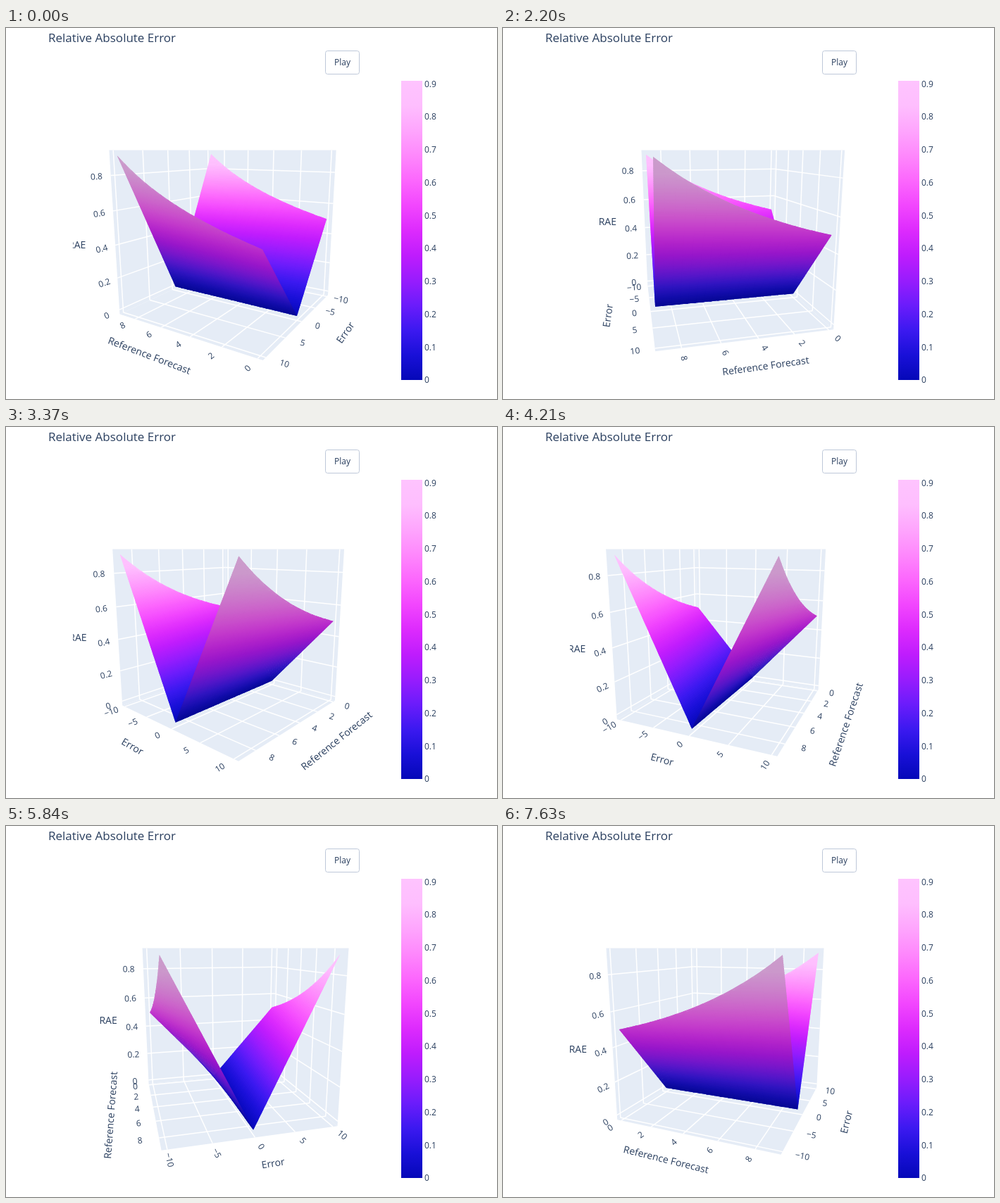
An HTML page with a canvas for the animation above (8 s loop, 697 by 527 pixels).

```html
<!DOCTYPE html>
<html>
<head>
<meta charset="utf-8">
<title>Relative Absolute Error</title>
<style>
html, body { margin: 0; width: 100%; height: 100%; overflow: hidden; background: #fff; }
canvas { display: block; }
</style>
</head>
<body>
<canvas id="stage" width="697" height="527"></canvas>
<script>
const ctx = document.getElementById('stage').getContext('2d');
const INK = '#2a3f5f', FONT = 'px "Open Sans", sans-serif';
const LOOP = 8000;

// camera: starts at (-1.25, 2, 0.5) and circles in steps of 0.1 rad
const EYE_Z = 0.5, RADIUS = Math.hypot(1.25, 2), START = Math.atan2(2, -1.25);
const DIST = Math.hypot(RADIUS, EYE_Z), SIN = EYE_Z / DIST, COS = RADIUS / DIST;
const SCENE = { x: 95, y: 65, w: 446.8, h: 445 };
const CX = SCENE.x + SCENE.w / 2, CY = SCENE.y + SCENE.h / 2;
const FOCAL = SCENE.h / 2 / Math.tan(Math.PI / 8);

// [time, step] at the uneven moments; between them one step per entry, evenly spaced
const KEYS = [[0, 0], [230, 1], [730, 2], [1110, 4], [1590, 5], [1780, 6], [2200, 8],
  [2660, 10], [2895, 12], [3370, 14], [3830, 16], [4210, 17], [5160, 21], [5370, 22],
  [5840, 24], [6000, 25], [6460, 27], [6695, 29], [7630, 33]];

function stepAt(t) {
  let i = KEYS.length - 1;
  while (KEYS[i][0] > t) i--;
  const [t0, n0] = KEYS[i];
  if (i === KEYS.length - 1) return n0;
  const [t1, n1] = KEYS[i + 1];
  const gap = n1 - n0;
  // a double step within one short interval is a single jump
  if (t1 - t0 < 300) return n0;
  return n0 + Math.floor((t - t0) / (t1 - t0) * gap + 1e-6);
}

// data: z = |error| / (20 - reference)
const Z_MAX = 10 / 11;
const toX = r => (r - 4.5) / 9 * 16 / 17;
const toY = e => e / 20 * 16 / 17;
const toZ = z => (z / Z_MAX - 0.5) * 16 / 17;
const X_TICKS = [0, 2, 4, 6, 8], Y_TICKS = [-10, -5, 0, 5, 10], Z_TICKS = [0, 0.2, 0.4, 0.6, 0.8];

const COLORS = ['0508b8', '1910d8', '3c19f0', '6b1cfb', '981cfd', 'bf1cfd', 'dd2bfd',
  'f246fe', 'fc67fd', 'fe88fc', 'fea5fd', 'febefe', 'fec3fe']
  .map(c => [0, 2, 4].map(i => parseInt(c.substr(i, 2), 16)));

function shade(v, light) {
  const p = Math.min(v, 0.9999) * 12, i = Math.floor(p), f = p - i;
  const mix = COLORS[i].map((c, k) => Math.round((c + (COLORS[i + 1][k] - c) * f) * light));
  return `rgb(${mix})`;
}

let ca, sa;
function project([x, y, z]) {
  const side = y * ca - x * sa, near = x * ca + y * sa;
  const depth = DIST - near * COS - z * SIN;
  return [CX + FOCAL * side / depth, CY - FOCAL * (z * COS - near * SIN) / depth];
}

function fill(points, color) {
  ctx.fillStyle = color;
  ctx.beginPath();
  points.forEach(p => ctx.lineTo(p[0], p[1]));
  ctx.fill();
}

function line(a, b) {
  ctx.beginPath();
  ctx.moveTo(...project(a));
  ctx.lineTo(...project(b));
  ctx.stroke();
}

function text(str, x, y, size, align = 'left', angle = 0) {
  ctx.save();
  ctx.translate(x, y);
  ctx.rotate(angle);
  ctx.font = size + FONT;
  ctx.textAlign = align;
  ctx.fillStyle = INK;
  ctx.fillText(str, 0, size * 0.36);
  ctx.restore();
}

// text at a point in space, turned along dir but kept upright
function label(str, pos, size, dir) {
  const [x, y] = project(pos);
  let angle = 0;
  if (dir) {
    const [u, v] = project(pos.map((p, i) => p + dir[i] * 0.01));
    angle = Math.atan2(v - y, u - x);
    if (angle > Math.PI / 2) angle -= Math.PI;
    if (angle <= -Math.PI / 2) angle += Math.PI;
  }
  text(String(str).replace('-', '\u2212'), x, y, size, 'center', angle);
}

function drawBox(bx, by) {
  const h = 0.5, wall = '#e5ecf6';
  fill([[-h, -h, -h], [h, -h, -h], [h, h, -h], [-h, h, -h]].map(project), wall);
  fill([[bx, -h, -h], [bx, h, -h], [bx, h, h], [bx, -h, h]].map(project), wall);
  fill([[-h, by, -h], [h, by, -h], [h, by, h], [-h, by, h]].map(project), wall);
  ctx.strokeStyle = '#fff';
  ctx.lineWidth = 1.5;
  for (const x of X_TICKS.map(toX)) {
    line([x, -h, -h], [x, h, -h]);
    line([x, by, -h], [x, by, h]);
  }
  for (const y of Y_TICKS.map(toY)) {
    line([-h, y, -h], [h, y, -h]);
    line([bx, y, -h], [bx, y, h]);
  }
  for (const z of Z_TICKS.map(toZ)) {
    line([bx, -h, z], [bx, h, z]);
    line([-h, by, z], [h, by, z]);
  }
}

// one half of the valley, far slices first; cells overlap the next ones to hide seams
function drawFace(sign) {
  const SLICES = 18, BANDS = 100, dr = 9 / SLICES, dz = Z_MAX / BANDS;
  const forward = ca > 0;
  const point = (r, z) => {
    const v = Math.min(z, 10 / (20 - r));
    return project([toX(r), toY(sign * v * (20 - r)), toZ(v)]);
  };
  for (let i = 0; i < SLICES; i++) {
    const k = forward ? i : SLICES - 1 - i;
    const r0 = Math.max(0, (forward ? k : k - 0.3) * dr);
    const r1 = Math.min(9, (forward ? k + 1.3 : k + 1) * dr);
    for (let j = 0; j < BANDS && j * dz < 10 / (20 - r1); j++) {
      const lo = j * dz, hi = lo + dz * 1.6;
      const quad = [point(r0, lo), point(r1, lo), point(r1, hi), point(r0, hi)];
      const area = quad.reduce((s, p, n) => {
        const q = quad[(n + 1) % 4];
        return s + p[0] * q[1] - q[0] * p[1];
      }, 0);
      fill(quad, shade((j + 0.5) / BANDS, area * sign > 0 ? 0.8 : 1));
    }
  }
}

function drawLabels(bx, by) {
  const pad = 0.1, far = 0.26, fx = -bx, fy = -by, ox = Math.sign(fx), oy = Math.sign(fy);
  const X = [1, 0, 0], Y = [0, 1, 0];
  X_TICKS.forEach(v => label(v, [toX(v), fy + oy * pad, -0.5], 12, Y));
  Y_TICKS.forEach(v => label(v, [fx + ox * pad, toY(v), -0.5], 12, X));
  label('Reference Forecast', [0, fy + oy * far, -0.5], 14, X);
  label('Error', [fx + ox * far, 0, -0.5], 14, Y);

  // the vertical scale stands on the left outer edge
  const onX = project([bx, fy, 0])[0] < project([fx, by, 0])[0];
  const at = (d, z) => onX ? [bx, fy + oy * d, z] : [fx + ox * d, by, z];
  Z_TICKS.forEach(v => label(v, at(pad, toZ(v)), 12, onX ? Y : X));
  label('RAE', at(far, 0), 14);
}

function drawFrame() {
  text('Relative Absolute Error', 60, 14, 17);

  ctx.strokeStyle = '#bec8d9';
  ctx.lineWidth = 1;
  ctx.beginPath();
  ctx.roundRect(453.5, 32.5, 48, 33, 3);
  ctx.stroke();
  text('Play', 477.5, 49, 12, 'center');

  const top = 75, bottom = 500;
  const bar = ctx.createLinearGradient(0, bottom, 0, top);
  COLORS.forEach((c, i) => bar.addColorStop(i / 12, `rgb(${c})`));
  ctx.fillStyle = bar;
  ctx.fillRect(561, top, 30, bottom - top);
  for (let i = 0; i < 10; i++) {
    text(String(i / 10), 594, bottom - (bottom - top) * i / 10 / Z_MAX, 12);
  }
}

function draw(step) {
  const angle = START - step * 0.1;
  ca = Math.cos(angle);
  sa = Math.sin(angle);
  const bx = ca > 0 ? -0.5 : 0.5, by = sa > 0 ? -0.5 : 0.5;
  ctx.fillStyle = '#fff';
  ctx.fillRect(0, 0, 697, 527);
  drawFrame();
  ctx.save();
  ctx.beginPath();
  ctx.rect(SCENE.x, SCENE.y, SCENE.w, SCENE.h);
  ctx.clip();
  drawBox(bx, by);
  drawFace(Math.sign(by));
  drawFace(-Math.sign(by));
  drawLabels(bx, by);
  ctx.restore();
}

const begin = performance.now();
let shown = -1;
function tick() {
  const step = stepAt((performance.now() - begin) % LOOP);
  if (step !== shown) draw(shown = step);
  requestAnimationFrame(tick);
}
tick();
</script>
</body>
</html>
```
